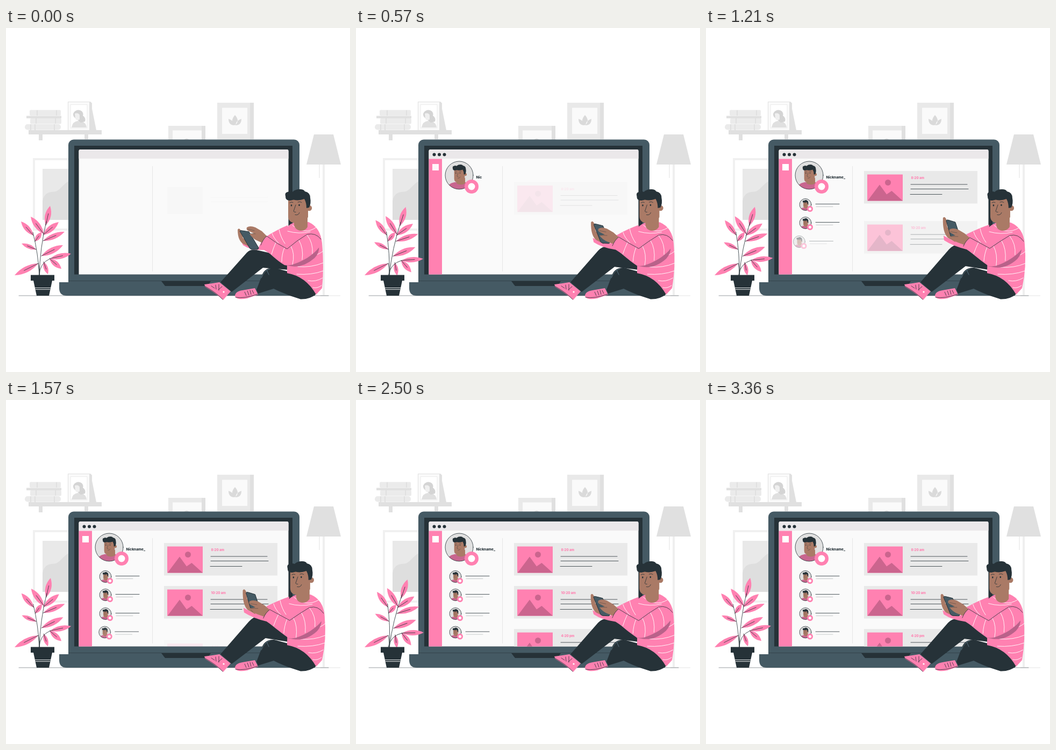
An HTML page that plays this animation: 640x640 px, repeating every 3430 ms.

```html
<!DOCTYPE html>
<html lang="en">
<head>
<meta charset="utf-8">
<title>Social feed on a laptop</title>
<style>
html, body { margin: 0; width: 100%; height: 100%; overflow: hidden; background: #fff; }
svg { display: block; width: 100vw; height: 100vh; }
text { font-family: Inter, sans-serif; font-weight: 800; }
.pink { fill: #ff81b1; }
.dark { fill: #263238; }
.skin { fill: #aa7a66; }
.steel { fill: #455a64; }
.ink { fill: none; stroke: #263238; stroke-width: .8; stroke-linecap: round; stroke-linejoin: round; }
.thread { fill: none; stroke: #fff; stroke-width: .9; stroke-linecap: round; }
</style>
</head>
<body>
<svg viewBox="0 0 640 640">
<defs>
  <clipPath id="screen"><path d="M135.500 458.500V229q0-3 3-3H522.500q3 0 3 3V458.500z"/></clipPath>
  <clipPath id="round"><circle r="26"/></clipPath>
  <g id="head">
    <circle class="skin" cx="564" cy="335" r="5.2"/>
    <path class="skin" d="M525 316V350Q525 363 541 363Q556 362 562 352V316z"/>
    <path class="dark" d="M520 313Q518 306 524 305Q529 303 533 305Q538 300 547 300Q554 300 556 304Q566 306 566 316Q568 326 564 334L559 335Q559 325 555 318Q545 322 535 319.500Q525 323 521 318Q520 316 520 313z"/>
    <path class="ink" d="M528 325Q531 323 534 324.500M543 324Q547 322 550 324.500M539 329L535 341Q536 343 539 342.500M538 347.500Q544 349 546 343.500"/>
  </g>
  <g id="eyes" class="dark"><ellipse cx="531" cy="330" rx="1.300" ry="1.800"/><ellipse cx="545.500" cy="329.500" rx="1.300" ry="1.800"/></g>
  <g id="avatar">
    <circle r="26" fill="#e0e0e0"/>
    <g clip-path="url(#round)">
      <path d="M-24 28Q-22 15-9 13L9 11Q20 18 22 28z" fill="#c8668f"/>
      <path class="skin" d="M-5 5H11V15Q3 20-5 15z"/>
      <g transform="translate(-287.600 -179) scale(.53)"><use href="#head"/><use href="#eyes"/></g>
    </g>
    <circle class="ink" r="26" vector-effect="non-scaling-stroke"/>
  </g>
  <g id="post">
    <rect width="211" height="60.500" fill="#e9e9e9"/>
    <rect class="pink" x="6" y="6.500" width="66" height="49"/>
    <path d="M6.500 55.500L29 25.500L42 43.500L51.500 37L72 55.500z" fill="#cb658e"/>
    <circle cx="44.500" cy="21.500" r="5.500" fill="#cb658e"/>
    <path class="ink" d="M87 25H192M87 33.500H194M86 43.500H145"/>
  </g>
</defs>

<!-- wall -->
<g fill="#e0e0e0">
  <path d="M42 190H178V198H153V207H146V198H68V209H61V198H42z"/>
  <path d="M38 163.500H103V168H38zM160 150L168 190H160z"/>
  <g fill="#ebebeb"><rect x="44" y="152.500" width="58" height="10.500" rx="2"/><rect x="45" y="168" width="58" height="10.500" rx="2"/><rect x="35" y="179" width="67" height="10.500" rx="5"/></g>
  <path d="M58 153v10M94 153v10M56 168v10M92 168v10M46 179v11M54 179v11M90 179v11" stroke="#e0e0e0" stroke-width="2"/>
  <path d="M115 137H157L160 140V190H115z"/>
  <path d="M116 138H155V190H116z" fill="#fafafa"/>
  <path d="M120 142.500H151V186H120z" fill="#fff" stroke="#ebebeb"/>
  <path d="M122 185Q124 174 133 173H140Q149 176 150 185z"/>
  <path d="M127 166Q123 161 127 156Q133 150 140 154Q145 158 143 163Q149 167 147 174L139 176z" fill="#d4d4d4"/>
  <path d="M128 159Q135 157 137 162L137 170Q132 173 129 169z" fill="#f0f0f0"/>
  <path d="M302 182H371V208H302z"/><path d="M302 182H364V208H302z" fill="#e9e9e9"/>
  <path d="M310 190.500H364V208H310z" fill="#fafafa"/><path d="M331 208Q336 203 341 208z"/>
  <path d="M393 139H461V207H393z"/><path d="M393 139H454V207H393z" fill="#e9e9e9"/>
  <path d="M402 148.500H449V197H402z" fill="#fafafa"/>
  <path d="M426 162Q436 173 426 181Q416 173 426 162M414 169Q424 172 425 181Q414 181 414 169M438 169Q428 172 427 181Q438 181 438 169" fill="#dadada"/>
  <path d="M50 242H118V377H50z" fill="#f0f0f0"/><path d="M54 246H118V373H54z" fill="#fff"/>
  <path d="M68 262H118V357H68z" fill="#e9e9e9"/>
  <path d="M68 357V322Q71 306 85 305C101 305 101 294 118 284V357z" fill="#dedede"/>
  <path d="M589 254H593V497H589z" fill="#efefef"/><path d="M583 254V279" stroke="#e0e0e0"/>
  <path d="M573 198H609L623 254H559z"/>
</g>
<path d="M585 498H622" stroke="#e4e4e4"/><path class="ink" stroke-opacity=".6" d="M24 498H600"/>

<!-- laptop -->
<rect class="steel" x="116" y="207.500" width="430" height="275" rx="10"/>
<path class="dark" d="M127 219H533V458.500H127z"/>
<path class="steel" d="M99 473H575V498H113Q99 498 99 484z"/>
<path class="ink" stroke-opacity=".7" d="M117 470.500H546"/>
<path class="dark" d="M289 471H381L375 480H296z"/>
<g clip-path="url(#screen)">
  <path d="M135 226H526V459H135z" fill="#fafafa"/>
  <path d="M135 226H526V243H135z" fill="#ebe8ea"/>
  <path d="M272.500 257V453" stroke="#e6e6e6"/>
  <g id="dots" class="dark"><circle cx="145.500" cy="235.500" r="3"/><circle cx="155" cy="235.500" r="3"/><circle cx="164.500" cy="235.500" r="3"/></g>
  <rect id="sidebar" class="pink" x="135" y="243.500" height="216"/>
  <rect id="mark" x="142" y="253" width="12" height="12" fill="#fff"/>
  <g id="ghost"><path d="M300 296H366V346H300z" fill="#f7f7f7"/><path d="M381 315H487M381 323H487" stroke="#f5f5f5"/></g>
  <g id="profile">
    <use href="#avatar" x="192" y="274"/>
    <circle class="pink" cx="215" cy="295" r="13"/><circle cx="215" cy="295" r="6.500" fill="#fff"/>
  </g>
  <text id="nick" class="dark" x="223.500" y="280" font-size="6.500"></text>
  <g id="rows"></g>
  <g id="posts"></g>
</g>

<!-- plant -->
<g id="plant"></g>
<path class="dark" d="M46 459.500H90V470H86L80 498H57L51 470H46z"/>
<path class="thread" d="M54 483.500H83M55 486.500H82"/>

<!-- person -->
<path class="pink" d="M369 477Q386 475 397 473L418 490L404 506Q390 493 371 482z"/>
<path class="ink" d="M371 481Q391 492 403 505M382 480L388 484M390 478L391 486M396 477L396 488M402 481L395 487"/>
<circle cx="405" cy="491" r="1.600" fill="#fff"/>
<path class="pink" d="M426 499Q426 490 440 488L463 484L469 496L449 503Q429 507 426 499z"/>
<path class="ink" d="M427 501Q444 504 468 495M444 491L447 498M449 489L452 497M454 488L456 496M458 488L461 494"/>
<path id="farLeg" class="dark"/>
<path class="dark" d="M466 487L477 458Q483 445 499 446L525 453Q565 463 577 495Q566 505 548 504.500Q522 497 498 485L469 494z"/>
<path class="ink" style="stroke:#607d8b" d="M475 465Q481 450 491 448M485 450L489 459"/>
<path id="farArm" class="pink"/>
<path id="torso" class="pink"/>
<path id="torsoThreads" class="thread"/>
<path id="neck" class="skin"/>
<path id="farHand" class="skin"/>
<path id="phone" class="steel" stroke="#263238"/>
<path id="nearHand" class="skin"/>
<path id="fingers" class="ink" stroke-opacity=".5"/>
<path id="armShade" fill="#b9628a"/>
<path id="nearArm" class="pink"/>
<path id="armThreads" class="thread"/>
<path id="armLine" class="ink"/>
<g id="face">
  <use href="#head"/><use id="open" href="#eyes"/>
  <path id="shut" class="ink" d="M528.500 330.500Q531 331.500 534 330.500M543 330Q545.500 331 548.500 329.500"/>
</g>
</svg>
<script>
const LOOP = 3430;
const $ = id => document.getElementById(id);
const ease = (t, a, b) => {
  const k = Math.min(1, Math.max(0, (t - a) / (b - a)));
  return k * k * (3 - 2 * k);
};
const place = (el, x, y, alpha) => {
  el.setAttribute('transform', `translate(${x} ${y})`);
  el.setAttribute('opacity', alpha);
};

// Blends two paths that share the same commands.
const number = /-?[\d.]+/g;
const blend = (a, b, k) => {
  const ends = b.match(number);
  let i = 0;
  return a.replace(number, v => (+v + (ends[i++] - v) * k).toFixed(2));
};

// Each part: relaxed pose, raised pose.
const poses = {
  farLeg: ['M399 473L448 418Q455 411 466 413L523 426L526 450L478 446L420 491z',
           'M399 473L452 412Q463 400 476 403L523 426L526 450L483 443L420 491z'],
  farArm: ['M524 367Q500 377 478 392L470 408L452 403L438 398L441 404Q455 414 480 413L524 440z',
           'M527 366Q508 372 486 383L476 396L460 396L442 386L443 395Q460 406 485 412L526 440z'],
  torso: ['M522 372Q529 363 541 360L563 361Q585 371 588 400Q592 445 588 484L577 496Q558 462 523 456z',
          'M525 372Q532 364 545 361L567 362Q591 372 593 402Q597 445 588 484L577 496Q558 462 523 456z'],
  torsoThreads: ['M508 375Q511 390 519 401M495 382Q498 391 507 400M524 378Q545 384 566 379M533 367Q555 386 577 371M570 424Q581 422 590 415M543 444Q568 446 590 437M541 458Q568 460 590 452M562 470Q576 473 589 465M571 483Q579 485 587 479',
                 'M510 373Q513 388 521 399M498 379Q501 390 511 399M527 379Q548 385 570 380M536 367Q558 386 582 372M575 425Q586 423 594 416M548 445Q573 447 594 438M543 458Q571 460 593 452M563 470Q577 473 590 465M571 483Q579 485 587 479'],
  neck: ['M536 350H561V370Q557 378 547 377Q538 375 536 367z', 'M540 350H565V370Q560 378 550 377Q541 375 540 367z'],
  farHand: ['M431 375Q434 371 437 377L441 391L456 400L456 408L442 402Q431 396 431 375z',
            'M441 353Q444 349 447 355L449 370L464 386L464 398L450 390Q440 380 441 353z'],
  phone: ['M435 378Q436 376 439 377L452 379L470 409Q470 412 467 412L457 412Q454 411 453 409z',
          'M447 358Q448 356 451 357L464 361L474 392Q473 395 470 394L460 393Q457 392 456 390z'],
  nearHand: ['M448 371Q454 367 464 371L476 378L489 391L482 402L466 395Q459 392 453 383L461 382L452 378Q446 376 448 371z',
             'M453 375Q459 371 469 375L481 382L495 394L488 406L471 400Q459 396 453 388L464 386L457 382Q451 380 453 375z'],
  fingers: ['M450 374L462 377M454 382L464 383', 'M455 379L467 381M456 388L469 388'],
  armShade: ['M518 441Q560 432 582 405Q584 418 574 428Q552 447 530 443z',
             'M524 443Q565 434 587 408Q588 420 579 430Q558 449 535 445z'],
  nearArm: ['M560 384Q583 380 587 398Q584 412 560 428Q532 444 518 441Q505 434 474 404Q478 393 485 387Q505 402 523 411Q540 396 560 384z',
            'M565 386Q589 382 592 402Q588 416 566 430Q540 446 526 443Q510 432 479 406Q483 396 491 390Q510 400 528 410Q545 398 565 386z'],
  armThreads: ['M560 385Q572 400 570 420M545 395Q554 410 551 431M530 406Q538 420 533 440M518 409Q513 420 513 435M502 399Q497 410 494 421',
               'M565 387Q577 402 575 422M550 396Q559 411 557 433M535 406Q543 420 540 442M523 408Q518 420 517 434M507 399Q502 409 498 420'],
  armLine: ['M474 404Q478 393 485 387Q505 402 523 411Q540 396 560 384Q576 380 586 393',
            'M479 406Q483 396 491 390Q510 400 528 410Q545 398 565 386Q581 382 591 397']
};

$('rows').innerHTML = [328.5, 362.5, 397.5, 432].map(y => `<g>
  <use href="#avatar" transform="translate(185 ${y}) scale(.42)"/>
  <circle class="pink" cx="193.500" cy="${y + 8}" r="5.500"/>
  <circle cx="193.500" cy="${y + 8}" r="2.600" fill="#fff"/>
  <path class="ink" d="M204 ${y - 1}H248"/>
  <path class="ink" stroke-opacity=".3" d="M205 ${y + 4}H236"/></g>`).join('');

$('posts').innerHTML = ['8:20 am', '10:20 am', '4:20 pm'].map(time => `<g>
  <use href="#post"/><text class="pink" x="87.500" y="15" font-size="6">${time}</text></g>`).join('');

const leaf = ([x, y, tx, ty, w]) => {
  const dx = tx - x, dy = ty - y, n = w / Math.hypot(dx, dy);
  const side = s => `${x + dx * .5 - dy * n * s} ${y + dy * .5 + dx * n * s}`;
  return `<path class="pink" d="M${x} ${y}Q${side(1)} ${tx} ${ty}Q${side(-1)} ${x} ${y}"/>
    <path class="ink" d="M${x} ${y}L${x + dx * .6} ${y + dy * .6}"/>`;
};
const branch = (id, stems, leaves) =>
  `<g id="${id}">${leaves.map(leaf).join('')}<path class="ink" d="${stems}"/></g>`;
$('plant').innerHTML =
  branch('still', 'M60 438Q62 445 62 460', [[60, 438, 16, 460, 11]]) +
  branch('tall', 'M62 460Q63 410 75 360M62 460Q60 420 50 380', [
    [74, 367, 82, 331, 11], [70, 383, 46, 351, 11], [69, 385, 98, 361, 11], [69, 396, 109, 379, 10],
    [66, 424, 106, 404, 11], [51, 386, 28, 360, 10], [54, 397, 66, 380, 9], [56, 412, 29, 401, 8]]) +
  branch('low', 'M62 460Q62 438 82 429', [
    [82, 429, 121, 420, 10], [81, 429, 103, 448, 10], [70, 435, 78, 458, 8]]);

function draw(t) {
  const sway = (1 - Math.cos(t * 4 * Math.PI / LOOP)) / 2;
  $('tall').setAttribute('transform', `rotate(${6.3 * sway} 62 460)`);
  $('low').setAttribute('transform', `rotate(${12 * sway} 62 450)`);

  const lift = t < 1350 ? Math.sin(t / 1350 * Math.PI / 2) : 1 - .43 * ease(t, 1350, 2500);
  for (const id in poses) $(id).setAttribute('d', blend(...poses[id], lift));
  place($('face'), 4 * lift, 0, 1);
  const blink = [290, 860, 1930].some(b => Math.abs(t - b) < 75);
  $('open').setAttribute('opacity', blink ? 0 : 1);
  $('shut').setAttribute('opacity', blink ? 1 : 0);

  [...$('dots').children].forEach((dot, i) =>
    dot.setAttribute('opacity', ease(t, 70 + 70 * i, 210 + 70 * i)));
  $('sidebar').setAttribute('width', 25 * ease(t, 70, 430));
  $('mark').setAttribute('opacity', ease(t, 430, 600));
  $('ghost').setAttribute('opacity', t < 500 ? 1 : 0);
  const shown = ease(t, 100, 500);
  place($('profile'), 0, -20 * (1 - shown), shown);
  $('nick').textContent = 'Nickname_'.slice(0, Math.max(0, Math.floor((t - 430) / 40)));
  [...$('rows').children].forEach((row, i) => {
    const start = 610 + 222 * i, k = ease(t, start, start + 350);
    place(row, -20 * (1 - k), 0, k);
  });
  [...$('posts').children].forEach((post, i) => {
    const start = 430 + 500 * i, k = ease(t, start, start + 600);
    place(post, 294, 266 + 80 * i + 24 * (1 - k), k);
  });
}

function tick() {
  draw(performance.now() % LOOP);
  requestAnimationFrame(tick);
}
tick();
</script>
</body>
</html>
```
